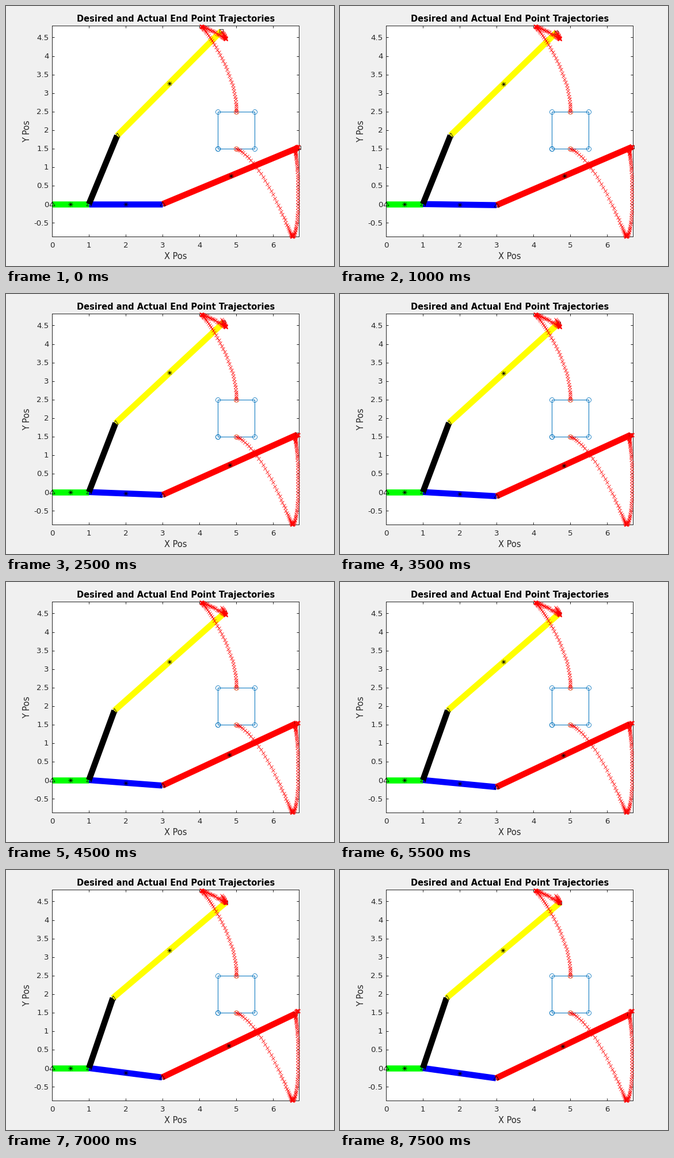
A matplotlib script that plays this animation: 570 px wide and 450 px high, repeating every 8 s.

```python
import numpy as np
import matplotlib.pyplot as plt
from matplotlib.animation import FuncAnimation

W, H, DPI = 570, 450, 100
PX = 72 / DPI            # points per pixel
SCALE = 64.07            # pixels per axis unit
LEFT, RIGHT, TOP, BOTTOM = 80, 509, 34, 399
Y_MIN = -0.877
Y_ZERO = BOTTOM + Y_MIN * SCALE
FRAMES, INTERVAL = 16, 500
INK = "#262626"

plt.rcParams["font.family"] = "DejaVu Sans"

fig = plt.figure(figsize=(W / DPI, H / DPI), dpi=DPI, facecolor="#f0f0f0")
ax = fig.add_axes([LEFT / W, 1 - BOTTOM / H,
                   (RIGHT - LEFT) / W, (BOTTOM - TOP) / H])
ax.set_xlim(0, (RIGHT - LEFT) / SCALE)
ax.set_ylim(Y_MIN, Y_MIN + (BOTTOM - TOP) / SCALE)
x_ticks = np.arange(0, 7)
y_ticks = np.arange(-0.5, 4.6, 0.5)
ax.set_xticks(x_ticks)
ax.set_yticks(y_ticks)
ax.tick_params(direction="in", length=4 * PX, width=PX, color=INK, top=True,
               right=True, labelbottom=False, labelleft=False)
for spine in ax.spines.values():
    spine.set_linewidth(PX)
    spine.set_edgecolor(INK)


def label(x, y, text, size, ha="center", color=INK, **kw):
    fig.text(x / W, 1 - y / H, text, fontsize=size * PX, ha=ha,
             va="baseline", color=color, **kw)


for v in x_ticks:
    label(LEFT + v * SCALE, 418, f"{v}", 13.33)
for v in y_ticks:
    label(74.5, Y_ZERO - v * SCALE + 4.7, f"{v:g}", 13.33, ha="right")
label(295, 27, "Desired and Actual End Point Trajectories", 14.6,
      color="black", weight="bold")
label(295, 438, "X Pos", 14.67)
label(41, 217, "Y Pos", 14.67, rotation=90, rotation_mode="anchor")


def polar(length, deg):
    a = np.radians(deg)
    return length * np.array([np.cos(a), np.sin(a)])


def ease(s, k):
    return k * s + (1 - k) * s * s


BASE = np.array([1.0, 0.0])


def upper_arm(s):
    elbow = BASE + polar(2, 67.5 + 3.8 * s)
    return elbow, elbow + polar(4, 45 - 5.1 * ease(s, 1.4))


def lower_arm(s):
    elbow = BASE + polar(2, -7.9 * ease(s, 0.75))
    return elbow, elbow + polar(4, 22.5 + 3 * ease(s, 1.75))


def bezier(p0, p1, p2, p3, steps):
    """Curve points that start slowly and end a little faster."""
    t = np.arange(1, steps + 1)[:, None] / steps
    u = t**2 * (2.4 - 1.4 * t)
    v = 1 - u
    return (v**3 * p0 + 3 * v**2 * u * np.array(p1)
            + 3 * v * u**2 * np.array(p2) + u**3 * np.array(p3))


def trail(arm, *curves):
    """Tip positions of the arm, then curves chained end to end."""
    pts = np.array([arm(i / 15)[1] for i in range(1, 16)])
    for curve in curves:
        pts = np.vstack([pts, bezier(pts[-1], *curve)])
    return pts


def marks(marker, size, color="black", z=5):
    return ax.plot([], [], ls="none", marker=marker, ms=size * PX, mfc="none",
                   mec=color, mew=0.8 * PX, clip_on=False, zorder=z)[0]


# Box with its handles
bx = [4.5, 5.5, 5.5, 4.5, 4.5]
by = [1.5, 1.5, 2.5, 2.5, 1.5]
ax.plot(bx, by, color="#0072bd", lw=PX, zorder=1.8)
marks("o", 8, "#0072bd", 1.8).set_data(bx, by)
marks("o", 8, "#d95319", 1.8).set_data([5, 5], [1.5, 2.5])

upper_trail = trail(upper_arm,
                    ((4.56, 4.56), (4.21, 4.77), (4.05, 4.80), 36),
                    ((4.25, 4.60), (5.00, 3.51), (5.00, 2.50), 45))
lower_trail = trail(lower_arm,
                    ((6.71, 0.83), (6.71, -0.87), (6.51, -0.87), 54),
                    ((6.41, -0.70), (5.73, 1.17), (5.00, 1.50), 45))
for pts in (upper_trail, lower_trail):
    marks("x", 5.2, "red", 6).set_data(*pts.T)

links = [ax.plot([], [], color=c, lw=10.5 * PX, solid_capstyle="butt",
                 zorder=2)[0]
         for c in ("lime", "blue", "red", "black", "yellow")]
joints = marks([(-1, -0.55), (0, 1), (1, -0.55), (-1, -0.55)], 9)
tips = marks("s", 6)
centers = [marks("+", 8.5), marks("x", 6)]


def update(n):
    s = n / (FRAMES - 1)
    origin = np.zeros(2)
    low, low_tip = lower_arm(s)
    up, up_tip = upper_arm(s)
    spans = np.array([(origin, BASE), (BASE, low), (low, low_tip),
                      (BASE, up), (up, up_tip)])
    for link, span in zip(links, spans):
        link.set_data(*span.T)
    joints.set_data(*np.array([origin, BASE, low, up]).T)
    tips.set_data(*np.array([low_tip, up_tip]).T)
    for c in centers:
        c.set_data(*spans.mean(axis=1).T)
    return [*links, joints, tips, *centers]


anim = FuncAnimation(fig, update, frames=FRAMES, interval=INTERVAL,
                     repeat=True, repeat_delay=0, blit=False)
plt.show()
```
